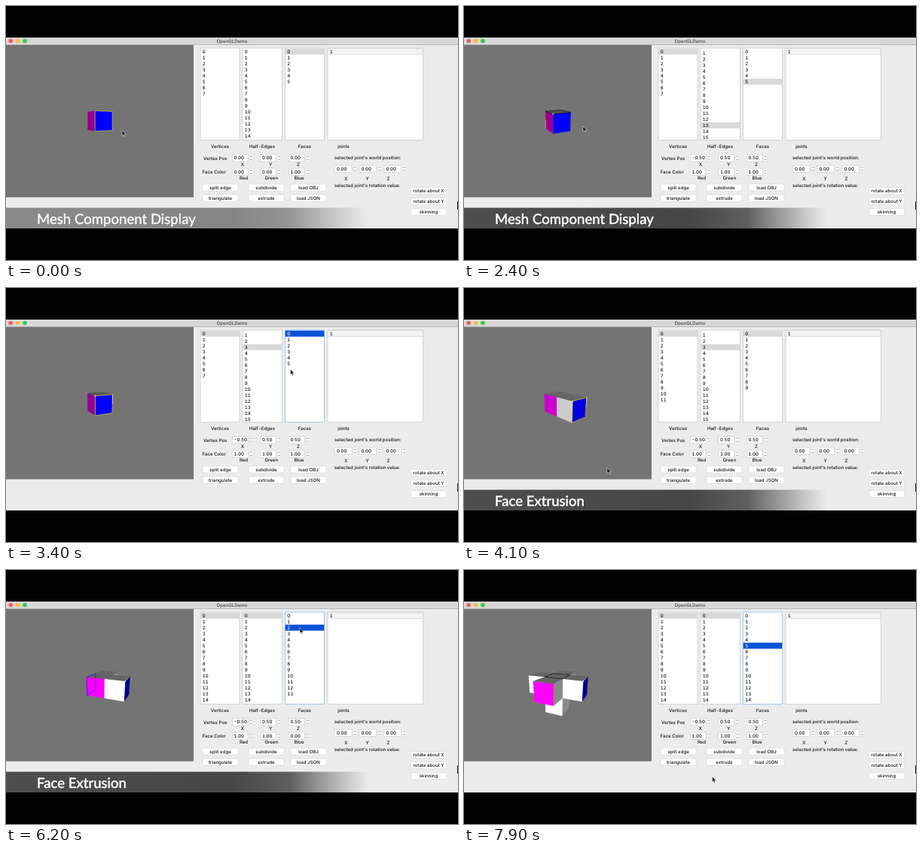
Write an HTML page that moves like this. It is 600 px wide and 338 px high and loops after 8000 ms.

```html
<!DOCTYPE html>
<html lang="en">
<head>
<meta charset="utf-8">
<title>Mesh editor demo</title>
<style>
  html, body { margin: 0; width: 100%; height: 100%; overflow: hidden; background: #000; }
  svg { display: block; }
  text {
    font: 500 6.1px Inter, "Liberation Sans", sans-serif; fill: #111; white-space: pre;
    font-variant-numeric: tabular-nums; text-rendering: geometricPrecision;
  }
  .banner { font: 18.6px Lato, "Open Sans", sans-serif; fill: #fff; stroke: #fff; stroke-width: .5; }
</style>
</head>
<body>
<svg id="stage" width="600" height="338" viewBox="0 0 600 338">
  <defs>
    <linearGradient id="bar">
      <stop offset="0" stop-color="#4e4e4e"/>
      <stop offset=".62" stop-color="#464646"/>
      <stop offset=".78" stop-color="#484848" stop-opacity=".86"/>
      <stop offset=".9" stop-color="#505050" stop-opacity=".4"/>
      <stop offset="1" stop-color="#606060" stop-opacity="0"/>
    </linearGradient>
  </defs>
  <g id="window"></g>
  <g id="mesh"></g>
  <g id="lists"></g>
  <g id="values"></g>
  <g id="banner">
    <rect y="268.5" width="482" height="27.5" fill="url(#bar)"/>
    <text class="banner" x="42" y="291" style="fill:#222;stroke:none" opacity=".35"></text>
    <text class="banner" x="41" y="290"></text>
  </g>
  <path id="cursor" d="M0 0V7.2L1.7 5.7L2.9 8.3L4.1 7.8L2.9 5.2H5.2Z" fill="#111" stroke="#e8e8e8" stroke-width=".6"/>
</svg>
<script>
const LOOP = 8000;
const INK = '#111';
const $ = id => document.getElementById(id);
const rect = (x, y, w, h, fill, more = '') =>
  `<rect x="${x}" y="${y}" width="${w}" height="${h}" fill="${fill}" ${more}/>`;
const label = (s, x, y, anchor = 'start', fill = INK) =>
  `<text x="${x}" y="${y}" text-anchor="${anchor}" style="fill:${fill}">${s}</text>`;
const mid = (s, x, y) => label(s, x, y, 'middle');

// ---- fixed window parts ----
const button = (s, x, y, w = 47) =>
  rect(x, y, w, 9, '#fff', 'rx="2" stroke="#cfcfcf" stroke-width=".5"') + mid(s, x + w / 2, y + 6.7);

const stepper = (x, y) =>
  rect(x, y - 4.5, 5, 9, '#fff', 'rx="1.8" stroke="#cdcdcd" stroke-width=".4"') +
  `<path d="M${x + 1.3} ${y - 1.3}l1.2-1.3l1.2 1.3M${x + 1.3} ${y + 1.3}l1.2 1.3l1.2-1.3" fill="none" stroke="#444" stroke-width=".6"/>`;

const field = (x, y, w = 20.5) =>
  rect(x, y - 4.7, w, 9.4, '#fff', 'stroke="#c4c4c4" stroke-width=".5"') + stepper(x + w + 1.7, y);

const SPIN_X = [300.5, 338, 375.5], JOINT_X = [436.5, 469, 502];

function drawWindow() {
  const lights = ['#fc5b57', '#fdbc40', '#34c84a'];
  $('window').innerHTML =
    rect(0, 42, 600, 254, '#ececec') +
    rect(0, 42, 600, 9, '#d8d8d8') + rect(0, 51, 600, 1, '#b8b8b8') +
    lights.map((c, i) => `<circle cx="${6.2 + i * 9.4}" cy="46.5" r="2.8" fill="${c}"/>`).join('') +
    label('OpenGLDemo', 300, 48.8, 'middle', '#444') +
    rect(0, 52, 249, 202.5, '#747474') +
    rect(599, 260, 1, 11, '#111') +
    mid('Vertices', 284, 189.4) + mid('Half-Edges', 340, 189.4) +
    mid('Faces', 396.5, 189.4) + mid('joints', 448, 189.4) +
    label('Vertex Pos', 262, 204.6) + label('Face Color', 260.5, 222.9) +
    SPIN_X.map(x => field(x, 202.2) + field(x, 220.8)).join('') +
    JOINT_X.map(x => field(x, 216.8, 22.5) + label('0.00', x + 2.5, 219)).join('') +
    ['X', 'Y', 'Z'].map((s, i) => mid(s, 314 + 37 * i, 212.8) + mid(s, 451.5 + 28 * i, 231.6)).join('') +
    ['Red', 'Green', 'Blue'].map((s, i) => mid(s, 315.5 + 36.8 * i, 231.4)).join('') +
    label("selected joint's world position:", 436, 204.4) +
    label("selected joint's rotation value:", 436, 240.6) +
    ['split edge', 'subdivide', 'load OBJ'].map((s, i) => button(s, [261, 322, 378][i], 237)).join('') +
    ['triangulate', 'extrude', 'load JSON'].map((s, i) => button(s, [261, 322, 378][i], 251)).join('') +
    ['rotate about X', 'rotate about Y', 'skinning'].map((s, i) => button(s, 537.5, 241.5 + 14 * i)).join('');
}

// ---- timeline ----
const START = { vert: -1, half: -1, face: 0, scroll: 0, arms: 0, focus: false,
                pos: [0, 0, 0], color: [0, 0, 1] };
const STEPS = [
  [700, { vert: 0, pos: [-.5, .5, .5] }],
  [900, { half: 20, scroll: 46 }],
  [1000, { face: 5, color: [1, 1, 1] }],
  [1100, { half: 21, scroll: 54 }],
  [1500, { half: 0, scroll: 0 }],
  [1750, { half: 15, scroll: 6 }],
  [2000, { half: 14 }],
  [2200, { half: 13 }],
  [2600, { half: 12 }],
  [2750, { half: 3 }],
  [3300, { face: 0, focus: true }],
  [3600, { arms: 1 }],
  [3850, { focus: false }],
  [4550, { face: 1, focus: true, color: [1, 0, 0] }],
  [4950, { arms: 2, half: 0, scroll: 0 }],
  [6000, { face: 2, color: [1, 1, 0] }],
  [6500, { arms: 3 }],
  [6750, { face: 3, color: [1, 0, 1] }],
  [6950, { arms: 4 }],
  [7150, { face: 4, color: [0, 1, 1] }],
  [7350, { arms: 5 }],
  [7550, { face: 5, color: [1, 1, 1] }]
];
const CURSOR = [
  [0, 154, 165.5], [150, 154, 165.5], [600, 158, 160], [2950, 158, 160], [3250, 389, 58],
  [3350, 389, 58], [3550, 344, 255], [3650, 344, 255], [3950, 190, 239.5], [4150, 190, 239.5],
  [4350, 228, 239], [4520, 389, 67], [4600, 389, 67], [4900, 344, 255], [5500, 344, 256],
  [5900, 390, 77], [6250, 390, 77], [6450, 344, 255], [6530, 344, 255], [6720, 389, 83],
  [6780, 389, 83], [6920, 344, 255], [6980, 344, 255], [7120, 389, 91], [7180, 389, 91],
  [7320, 344, 255], [7380, 344, 255], [7520, 389, 99], [7600, 389, 99], [7900, 329.5, 275]
];
// time, yaw, pitch in degrees
const VIEW = [[0, 26, 0], [150, 26, 0], [600, 27, 12.5], [3650, 27, 12.5],
              [4000, 42, 16], [4150, 42, 16], [4400, 65, 16]];
const FADE = [[0, .62], [450, 1], [2450, 1], [2950, 0], [3450, 0], [3950, 1], [6500, 1], [7000, 0]];

function tween(keys, t) {
  const i = keys.findIndex(k => k[0] > t);
  if (i < 0) return keys[keys.length - 1].slice(1);
  const [a, b] = [keys[i - 1], keys[i]];
  const u = (t - a[0]) / (b[0] - a[0]);
  return a.slice(1).map((v, j) => v + (b[j + 1] - v) * u);
}

const stateAt = t => Object.assign({}, START, ...STEPS.filter(s => s[0] <= t).map(s => s[1]));

// ---- mesh: axes are front, right, up ----
const WHITE = [1, 1, 1];
const FACES = [
  { n: [1, 0, 0], a: [0, 1, 0], b: [0, 0, 1], color: [0, 0, 1] },
  { n: [0, 1, 0], a: [-1, 0, 0], b: [0, 0, 1], color: [1, 0, 0] },
  { n: [-1, 0, 0], a: [0, -1, 0], b: [0, 0, 1], color: [1, 1, 0] },
  { n: [0, -1, 0], a: [1, 0, 0], b: [0, 0, 1], color: [1, 0, 1] },
  { n: [0, 0, -1], a: [0, 1, 0], b: [1, 0, 0], color: [0, 1, 1] },
  { n: [0, 0, 1], a: [0, 1, 0], b: [-1, 0, 0], color: WHITE }
];
const CORNERS = [[.5, .5], [-.5, .5], [-.5, -.5], [.5, -.5]];
const quad = (face, at) => CORNERS.map(([s, r]) =>
  at.map((c, i) => c + face.n[i] / 2 + face.a[i] * s + face.b[i] * r));
const rgb = (c, k = 1) => `rgb(${c.map(v => Math.round(v * k * 255))})`;
const points = ps => ps.map(p => p.map(v => v.toFixed(2)).join()).join(' ');
const same = (p, q) => p.every((v, i) => v === q[i]);

function camera(yaw, pitch) {
  const rad = Math.PI / 180;
  const [sy, cy, sp, cp] = [Math.sin(yaw * rad), Math.cos(yaw * rad), Math.sin(pitch * rad), Math.cos(pitch * rad)];
  const turn = ([f, r, u]) => {
    const z = f * cy - r * sy;
    return [f * sy + r * cy, z * sp - u * cp, z * cp + u * sp];
  };
  const project = p => {
    const [x, y, z] = turn(p), k = 24.5 * 7 / (7 - z);
    return [124.3 + x * k, 153 + y * k];
  };
  return { turn, project };
}

function drawMesh(s, t) {
  const { turn, project } = camera(...tween(VIEW, t));
  const depth = p => turn(p)[2];
  const core = [0, 0, 0];
  const arms = FACES.slice(0, s.arms).map(f => f.n);
  const cubes = [core, ...arms].sort((p, q) => depth(p) - depth(q));
  let out = '';
  for (const at of cubes) {
    FACES.forEach((face, i) => {
      const next = at.map((v, j) => v + face.n[j]);
      if (cubes.some(c => same(c, next))) return;
      const ps = quad(face, at).map(project);
      const [p, q, r] = ps;
      if ((q[0] - p[0]) * (r[1] - p[1]) - (q[1] - p[1]) * (r[0] - p[0]) >= 0) return;
      const own = at === core || same(at, face.n);
      const fill = rgb(own ? face.color : WHITE, Math.min(1, .1 + 1.08 * depth(face.n)));
      out += `<polygon points="${points(ps)}" fill="${fill}" stroke="${fill}" stroke-width=".3"/>`;
    });
  }
  const cap = i => quad(FACES[i], i < s.arms ? FACES[i].n : core).map(project);
  const inverse = rgb(FACES[s.face].color.map(v => 1 - v));
  out += `<polygon points="${points(cap(s.face))}" fill="none" stroke="${inverse}" stroke-width=".6"/>`;
  if (s.half >= 0) {
    const ps = cap(s.half >> 2), k = s.half % 4;
    const [p, q] = [ps[k], ps[(k + 1) % 4]];
    const m = [(p[0] + q[0]) / 2, (p[1] + q[1]) / 2];
    out += `<polyline points="${points([p, m])}" stroke="#d84a3a" stroke-width=".5"/>` +
           `<polyline points="${points([m, q])}" stroke="#eeea90" stroke-width=".6"/>`;
  }
  if (s.vert >= 0) {
    const [x, y] = cap(0)[1];
    out += `<circle cx="${x}" cy="${y}" r=".8" fill="#fff"/>`;
  }
  $('mesh').innerHTML = out;
}

// ---- lists and values ----
function list(x, w, first, count, picked, { scroll = 0, focus = false, tint = '#d9d9d9' } = {}) {
  let rows = '';
  for (let i = 0; i < count; i++) {
    const y = .7 + 8 * i - scroll;
    if (y < -5 || y > 120) continue;
    const on = i === picked;
    if (on) rows += rect(0, y, w, 8, focus ? '#0852d6' : tint);
    rows += label(i + first, 2.8, y + 6.2, 'start', on && focus ? '#fff' : INK);
  }
  const border = focus ? 'stroke="#9cc2ec" stroke-width=".9"' : 'stroke="#bcbcbc" stroke-width=".6"';
  return rect(x, 56, w, 122.5, '#fff', border) +
    `<svg x="${x}" y="56" width="${w}" height="122.5">${rows}</svg>`;
}

function drawPanel(s, t) {
  const n = s.arms;
  const thumb = t >= 900 && t < 1500 ? rect(362, 39 + s.scroll, 2.6, 84, '#c6c6c6', 'rx="1.3"') : '';
  $('lists').innerHTML =
    list(258, 52, 0, 8 + 4 * n, s.vert) +
    list(314, 52.5, 0, 24 + 16 * n, s.half, { scroll: s.scroll }) + thumb +
    list(370.5, 52, 0, 6 + 4 * n, s.face, { focus: s.focus }) +
    list(427, 126.5, 1, 1, 0, { tint: '#f4f4f4' }) +
    rect(427, 56.4, 126.5, 8.3, 'none', 'stroke="#c4c4c4" stroke-width=".5"');
  const row = (vals, y) => vals.map((v, i) => label(v.toFixed(2), SPIN_X[i] + 2, y)).join('');
  $('values').innerHTML = row(s.pos, 204.4) + row(s.color, 223);
}

function drawBanner(t) {
  const title = t < 3200 ? 'Mesh Component Display' : 'Face Extrusion';
  for (const el of $('banner').querySelectorAll('text')) el.textContent = title;
  $('banner').setAttribute('opacity', tween(FADE, t)[0]);
}

function draw(t) {
  const s = stateAt(t);
  drawMesh(s, t);
  drawPanel(s, t);
  drawBanner(t);
  $('cursor').setAttribute('transform', `translate(${tween(CURSOR, t)})`);
}

drawWindow();
const begin = performance.now();
function tick() {
  draw((performance.now() - begin) % LOOP);
  requestAnimationFrame(tick);
}
tick();
</script>
</body>
</html>
```
